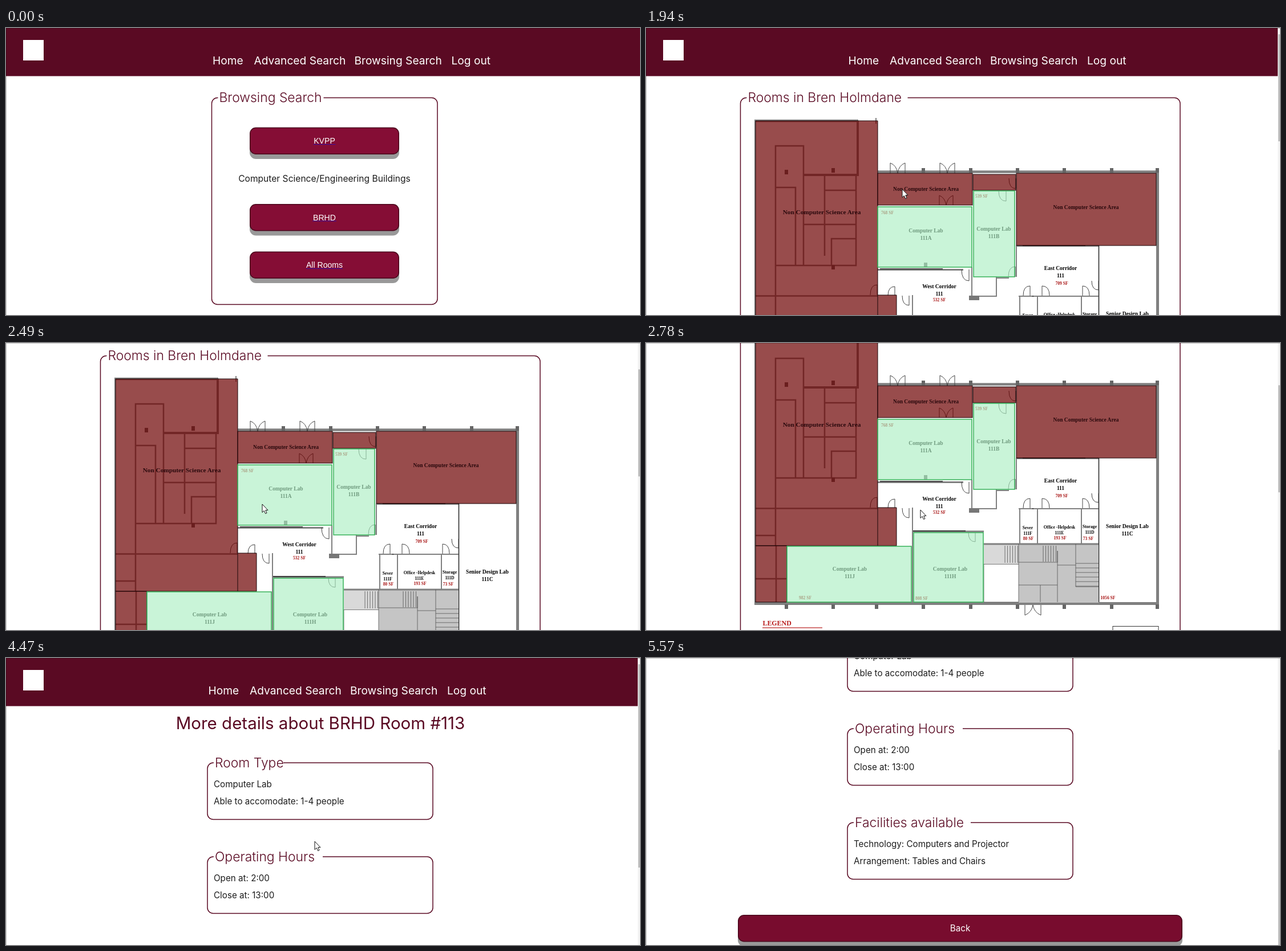
Animation, 1111 px wide and 504 px high, one loop 6120 ms. Source, as an HTML page:

```html
<!DOCTYPE html>
<html lang="en">
<head>
<meta charset="utf-8">
<title>Room browser</title>
<style>
  html, body { margin: 0; width: 100%; height: 100%; overflow: hidden; background: #fff; }
  svg { display: block; width: 1111px; height: 504px; }
  text { white-space: pre; }
  .nav { font: 19.2px Inter, sans-serif; fill: #fff; }
  .legend { font: 300 22.9px Inter, sans-serif; fill: #5a0a23; }
  .title { font: 29.5px Inter, sans-serif; fill: #5a0a23; }
  .body { font: 15.2px Inter, sans-serif; fill: #1c1c1c; }
  .link { font: 14.1px "Liberation Sans", Arial, sans-serif; fill: #fff; }
  .room { font: bold 9.5px "Liberation Serif", serif; }
  .small { font: bold 7.7px "Liberation Serif", serif; }
  .area { font: bold 7.6px "Liberation Serif", serif; fill: #a81414; }
  .zone { font: bold 9.5px "Liberation Serif", serif; fill: #2a090d; }
  .floor { font: bold 34px "Liberation Serif", serif; }
  .key { font: 9px "DejaVu Sans Mono", monospace; fill: #222; }
  .mid { text-anchor: middle; }
  .wall { fill: none; stroke: #808080; }
  .thin { fill: none; stroke: #444; }
  .red { fill: #6d0000; fill-opacity: .7; stroke: #1b0709; }
  .green { fill: #acefc3; fill-opacity: .65; stroke: #37b259; stroke-width: 1.5; }
</style>
</head>
<body>
<svg id="stage" viewBox="0 0 1111 504"></svg>
<script>
const LOOP = 6120, MAROON = '#5a0a23', BUTTON = '#850d35', HOVER = '#780c2e';

const rect = (x, y, w, h, attrs = '') =>
  `<rect x="${x}" y="${y}" width="${w}" height="${h}" ${attrs}/>`;
const path = (d, attrs) => `<path d="${d}" ${attrs}/>`;
const text = (x, y, s, cls, attrs = '') =>
  `<text x="${x}" y="${y}" class="${cls}" ${attrs}>${s}</text>`;
const mid = (x, y, s, cls, attrs) => text(x, y, s, cls + ' mid', attrs);

const header = (width, dx) =>
  rect(0, 0, width, 84.5, `fill="${MAROON}"`) + rect(30, 21, 36, 36, 'fill="#fff"') +
  [[362, 'Home'], [434.5, 'Advanced Search'], [610.5, 'Browsing Search'], [780.5, 'Log out']]
    .map(([x, s]) => text(x + dx, 64, s, 'nav')).join('');

const fieldset = (x, y, w, h, label, gap) =>
  rect(x, y, w, h, `rx="10" fill="none" stroke="${MAROON}" stroke-width="1.5"`) +
  rect(x + 11, y - 4, gap, 8, 'fill="#fff"') +
  text(x + 13, y + 7.5, label, 'legend');

const button = (x, y, w, label, cls, fill, id = '') =>
  rect(x, y + 8, w, 47.5, 'rx="11" fill="#999"') +
  rect(x + .75, y + .75, w - 1.5, 46, `id="${id}" rx="10" fill="${fill}" stroke="#4a071c" stroke-width="1.5"`) +
  mid(x + w / 2, y + 28.5, label, cls, 'style="fill:#fff"');

const link = (y, label, half, id) =>
  button(427, y, 262, label, 'link', BUTTON, id) +
  rect(558 - half, y + 29.5, half * 2, 1, 'fill="#3a10a0"');

const browsePage = header(1111, 0) +
  fieldset(360.5, 122.5, 395.5, 363, 'Browsing Search', 185) +
  link(174.5, 'KVPP', 19.5) +
  mid(558, 270, 'Computer Science/Engineering Buildings', 'body', 'style="font-size:15.6px"') +
  link(309, 'BRHD', 21, 'pick') + link(392.5, 'All Rooms', 32);

// Floor plan, in page coordinates.
const square = (x, y) => rect(x - 3, y - 4, 6, 8, 'fill="#666"');
const doubleDoor = (x, y, w = 13, h = 18) =>
  path(`M${x - w} ${y}v${-h}q${w - 2} 4 ${w} ${h}q2 ${4 - h} ${w} ${-h}v${h}`, 'class="thin"');
const door = (x, y, w, h) =>
  path(`M${x} ${y}v${h}q${w} 0 ${w} ${-h}`, 'class="thin"');
const bars = (n, x, y, dx, dy, d) =>
  Array.from({ length: n }, (_, i) => `M${x + i * dx} ${y + i * dy}${d}`).join('');
const label = (x, y, lines, cls = 'room', step = 13) =>
  lines.map((s, i) => mid(x, y + 3 + i * step, s, cls)).join('');
const area = (x, y, n) => mid(x, y + 2.5, n + ' SF', 'area');

const walls =
  path('M190 163H372M406 252.500H898', 'class="wall" stroke-width="4.500"') +
  path('M896.500 250V640M190 637.500H899', 'class="wall" stroke-width="5"') +
  path('M191 163V640M403 158v10M467 469V635', 'class="wall" stroke-width="2"') +
  path('M371 163V258H276', 'class="wall" stroke-width="4"') +
  path('M227 536V207H276V417M227 280H262V417M227 417H368V258M313 258V400M313 285H368' +
    'M276 345H368M325 417V370H368M192 470.500H406M228 536V635M192 518H228M192 594H247',
    'class="wall" stroke-width="2.500"') +
  [486, 569, 651, 733, 816, 896].map(x => square(x, 250)).join('') +
  [246, 328, 404, 486, 569, 651, 733, 816, 896].map(x => square(x, 643)).join('') +
  [[246, 253], [328, 250], [328, 420], [490, 416]].map(p => square(...p)).join('') +
  path('M406 424.500H556M467 511H592M649 382.500H793', 'class="wall" stroke-width="3"') +
  path('M410 423H520M468 510H560M660 382H770M793.500 382V635', 'fill="none" stroke="#222" stroke-width="1.500"') +
  path('M571 420V470M571 471H614V437M614 439H636M649 437V382M653 471H793' +
    'M655 471V532M686 471V532M763 471V532', 'class="wall" stroke-width="2"') +
  rect(566, 470, 18, 8, 'fill="#777"') +
  [441, 528].map(x => doubleDoor(x, 255)).join('') + doubleDoor(526, 311, 12, 17) +
  doubleDoor(678, 470, 0, 0) + door(566, 424, -13, 20) + door(631, 286, -13, 18) +
  door(647, 437, -12, -18) + door(648, 264, -12, 18) + door(405, 469, -12, -18) +
  door(436, 470, -12, -16) + door(461, 470, -12, 17) + door(577, 513, -12, 16) +
  door(673, 470, -12, -17) + door(694, 470, 13, -17) + door(765, 470, 12, -17) +
  door(793, 444, -12, 16) + door(595, 552, 14, -17);

const stairs =
  rect(592, 533, 61, 35, 'fill="#d9d9d9"') + rect(653, 533, 140, 103, 'fill="#c5c5c5"') +
  path('M592 533H793', 'class="wall" stroke-width="3"') +
  path('M592 568.500H653M592 635V568M653 533V635H592M653 605H691V635M721 545V635M721 570H753' +
    'M691 605H721M753 533V608H793M653 565H721V545' +
    bars(6, 629, 536, 4.500, 0, 'v30') + bars(6, 696, 536, 4.500, 0, 'v28') +
    bars(6, 753, 567, 0, 8, 'h40'), 'class="thin" stroke-opacity=".7"') +
  path('M664 640v18q12-5 14-18q2 13 14 18v-18', 'class="thin"');

const roomLabels =
  label(514, 454, ['West Corridor', '111']) + area(514, 477, 532) +
  label(726.5, 422, ['East Corridor', '111']) + area(728.5, 448, 709) +
  label(669, 504, ['Sever', '111F'], 'small', 10) + area(670, 523, 80) +
  label(724.5, 503, ['Office -Helpdesk', '111E'], 'small', 10) + area(725.5, 522, 193) +
  label(777.5, 502, ['Storage', '111D'], 'small', 10) + area(775, 523, 73) +
  label(843.5, 502, ['Senior Design Lab', '111C']) + area(809.5, 627, 1056) +
  label(490.5, 356, ['Computer Lab', '111A']) + area(423, 324, 768) +
  label(609.5, 353, ['Computer Lab', '111B']) + area(588, 295, 539) +
  label(357, 577, ['Computer Lab', '111J']) + area(279, 627, 982) +
  label(533, 577, ['Computer Lab', '111H']) + area(483, 628, 808);

const keyRows = [['ALARM ZONE PANEL', '#c22', 'A'], ['FIRE EXTINGUISHER', '#222', 'E'],
  ['PULL STATION', '#2a4', 'S'], ['DUCT DETECTOR', '#c22', ''],
  ['SMOKE DETECTOR', '', ''], ['FIRE ALARM', '#9de6ee', 'F']];
const key =
  text(204.5, 676, 'LEGEND', 'room', 'style="font-size:11.9px;fill:#b81c1c"') +
  rect(204, 679.5, 105, 1.2, 'fill="#b81c1c"') +
  keyRows.map(([s, color, mark], i) => {
    const y = 694 + i * 13.1;
    return text(217, y + 3.3, s, 'key') +
      (color && rect(205, y - 4.5, 9, 9, `fill="none" stroke="${color}"`)) +
      (mark ? mid(209.5, y + 3, mark, 'key', `style="fill:${color};font-size:8px"`)
        : `<circle cx="209.5" cy="${y}" r="3" fill="${color || '#111'}"/>`);
  }).join('') +
  mid(559, 757, 'Bren Holmdane 1<tspan dy="-13" font-size="20">st</tspan><tspan dy="13"> Floor</tspan>', 'floor') +
  rect(818, 677.5, 80, 82.5, 'fill="none" stroke="#333"') +
  [['Faculty', '#7d0b1e'], ['Staff', '#0c7d34'], ['GRAD', '#d04545']].map(([s, color], i) =>
    mid(858, 709 + i * 13, s, 'link', `style="font-size:9.6px;fill:${color}"`)).join('');

const zones =
  path('M192 163H406V469H439V536H192ZM406 469V536', 'class="red"') +
  [[192, 536, 54.5, 99], [406, 255, 166, 56], [573, 257, 75, 28], [649, 255, 245, 127]]
    .map(r => rect(...r, 'class="red"')).join('') +
  [[406, 314, 165, 106], [574, 286, 72, 151], [469, 513, 122, 122], [247, 537, 218, 98]]
    .map(r => rect(...r, 'class="green"')).join('') +
  mid(308, 327, 'Non Computer Science Area', 'zone', 'style="font-size:11.3px"') +
  mid(490.5, 286, 'Non Computer Science Area', 'zone') +
  mid(771, 318, 'Non Computer Science Area', 'zone');

const planPage = header(1107, -7.5) +
  fieldset(165.5, 122.5, 770.5, 1200, 'Rooms in Bren Holmdane', 282) +
  `<g id="plan">${walls}${stairs}${roomLabels}${key}</g><g id="zones">${zones}</g>` +
  rect(467.5, 512, 123.5, 124, 'id="focus" fill="none" stroke="#6f93cf"');

const details = [
  ['Room Type', 122, 'Computer Lab', 'Able to accomodate: 1-4 people'],
  ['Operating Hours', 191, 'Open at: 2:00', 'Close at: 13:00'],
  ['Facilities available', 205, 'Technology: Computers and Projector', 'Arrangement: Tables and Chairs']];
const detailPage = header(1107, -7.5) +
  mid(551, 125, 'More details about BRHD Room #113', 'title') +
  details.map(([name, gap, a, b], i) => {
    const y = 184 + i * 165;
    return fieldset(353, y, 395, 99.5, name, gap) +
      text(364, y + 43, a, 'body') + text(364, y + 73, b, 'body');
  }).join('') +
  button(161, 676, 779, 'Back', 'body', HOVER);

const $ = id => document.getElementById(id);
$('stage').innerHTML =
  [browsePage, planPage, detailPage].map((p, i) => `<g id="page${i}">${p}</g>`).join('') +
  `<g id="bar">${rect(1107, 0, 4, 504, 'fill="#f3f3f3"')}${rect(1108, 0, 3, 0, 'id="thumb" fill="#bdbdbd"')}</g>` +
  path('M.5 504V.5H1111', 'fill="none" stroke="#000" stroke-opacity=".22"') +
  '<g id="cursor" fill="#fff" stroke="#111" stroke-linejoin="round">' +
  path('M0 0V14.500L3.300 11.500 5.600 16.600 8 15.600 5.800 10.600H10Z', 'id="arrow"') +
  path('M-1.500 11V1Q-1.500-.7 0-.7T1.500 1V6.200Q4.200 5.600 4.300 7Q6.800 6.400 6.900 7.800Q9 7.600 9 9.400' +
    'V13Q9 15 7.500 18H-.5Q-2 15-5.500 11.800Q-6.200 10-4.200 9.600Q-3 9.800-1.500 11Z' +
    'M1.500 6V10M4.300 7V10.500M6.900 8V10.500', 'id="hand"') + '</g>';

// Keys are [time, value, ...], joined by straight lines.
const scrolls = [null,
  [[2020, 0], [2240, 88], [2446, 88], [3090, 264]],
  [[4900, 0], [5030, 122], [5220, 176], [5570, 225]]];
const moves = [[70, 848, 440], [380, 557, 337], [1700, 557, 337], [1940, 449, 283], [2500, 449, 283],
  [3090, 516, 304], [3150, 516, 304], [3230, 521, 316], [4400, 521, 316], [4470, 541, 322],
  [4600, 541, 322], [4790, 602, 323]];
const thumbs = [null, [188, 2.84], [357, 1.496]];

function at(keys, t) {
  const i = keys.findIndex(k => k[0] > t);
  if (i < 1) return keys.at(i).slice(1);
  const [a, b] = [keys[i - 1], keys[i]], p = (t - a[0]) / (b[0] - a[0]);
  return a.slice(1).map((v, j) => v + (b[j + 1] - v) * p);
}
const show = (id, on) => { $(id).style.display = on ? '' : 'none'; };

function draw(now) {
  const t = now % LOOP;
  const page = t < 800 ? 0 : t < 4250 ? 1 : 2;
  for (let i = 0; i < 3; i++) show('page' + i, i === page);
  show('bar', page > 0);
  if (page) {
    const [y] = at(scrolls[page], t), [size, ratio] = thumbs[page];
    $('page' + page).setAttribute('transform', `translate(0 ${-Math.round(y)})`);
    $('thumb').setAttribute('y', 11 + y / ratio);
    $('thumb').setAttribute('height', size);
  }
  $('pick').setAttribute('fill', t >= 300 ? HOVER : BUTTON);
  show('plan', t >= 1500);
  show('zones', t >= 1550);
  show('focus', t >= 3690);

  const hand = (t >= 300 && t < 1780) || (t >= 3200 && t < 4470);
  show('cursor', t >= 70 && t < 5500);
  show('hand', hand);
  show('arrow', !hand);
  $('cursor').setAttribute('transform', `translate(${at(moves, t).join(' ')})`);
  requestAnimationFrame(draw);
}
requestAnimationFrame(draw);
</script>
</body>
</html>
```
